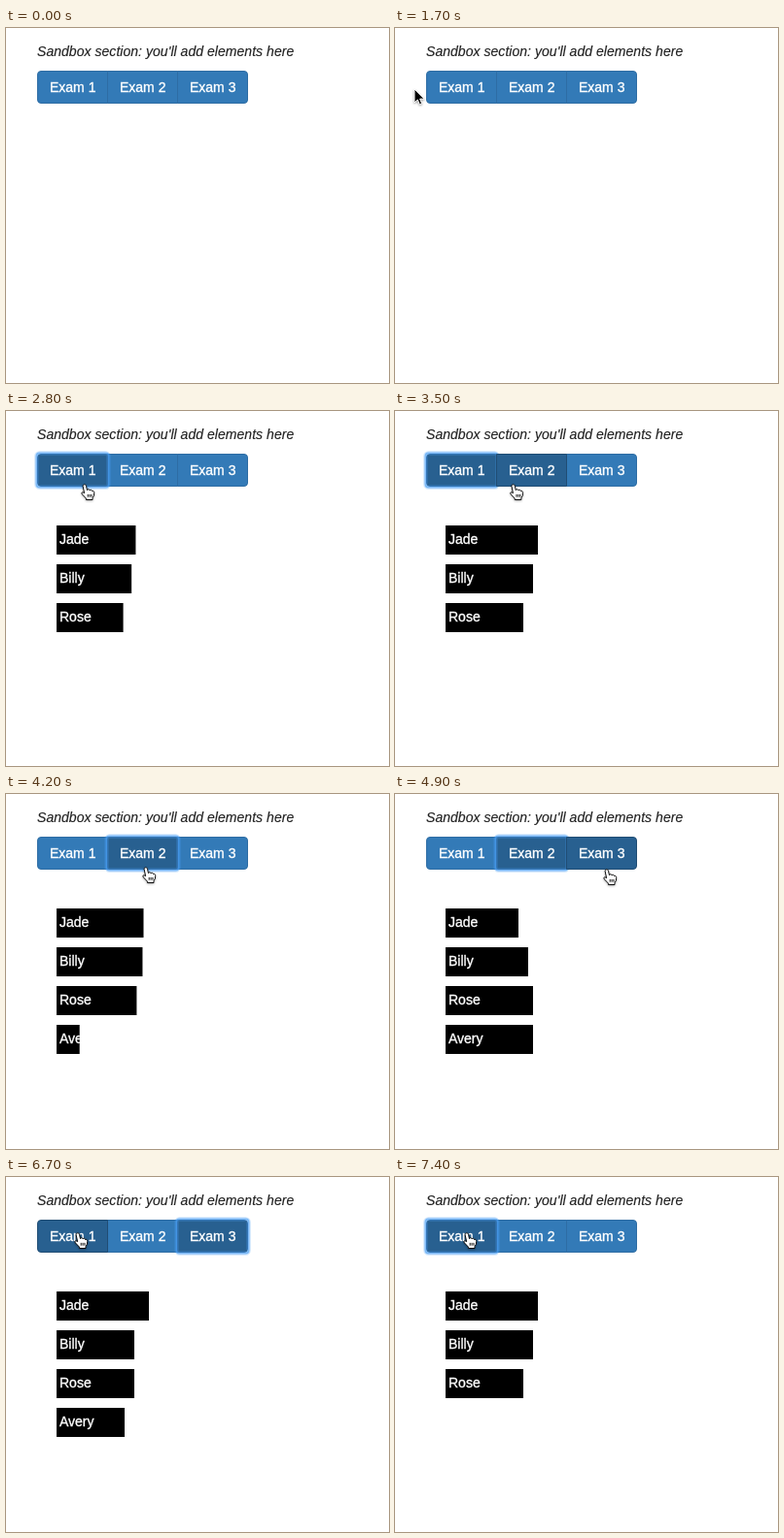
Write an HTML page that moves like this. It is 394 px wide and 366 px high and loops after 7600 ms.

```html
<!DOCTYPE html>
<html>
<head>
<meta charset="utf-8">
<style>
html, body { margin: 0; width: 100%; height: 100%; overflow: hidden; background: #fff; }
body > svg { display: block; font: 14px "Liberation Sans", Arial, sans-serif; }
text { fill: #fff; stroke: #fff; stroke-width: .35; }
#title { fill: #222; stroke: #222; stroke-width: .15; font-style: italic; letter-spacing: .04px; }
.btn path { fill: #337ab7; stroke: #2e6da4; }
.btn.dark path { fill: #286090; stroke: #204d74; }
#ring { fill: none; stroke: #4a9ff5; }
#arrow { stroke: #fff; stroke-linejoin: round; filter: drop-shadow(0 1px 1px #0006); }
#hand { fill: #fff; stroke: #000; stroke-linejoin: round; filter: drop-shadow(0 1px 1px #0005); }
</style>
</head>
<body>
<svg id="stage" width="394" height="366">
  <text id="title" x="32" y="29">Sandbox section: you'll add elements here</text>
  <g id="buttons"></g>
  <g id="bars"></g>
  <g id="cursor">
    <path id="arrow" d="M0 0V14l3.3-3.1 2 4.9 2.3-1-2-4.7h4.6z"/>
    <path id="hand" transform="scale(.94)" d="M-2 1.5C-2-.7 1.2-.8 1.6 1.3L2.6 6C3 4.6 5.2 4.8 5.4 6.2C6.2 5.2 7.9 5.6 8.1 7C9.4 6.4 10.4 7.3 10.3 9L10 12 8.5 14.5v2h-7V15L-2.8 10.5C-4.2 8.6-2.5 7.6-1 8.8l.6.4zM3.4 10.5v3m2-3v3m2-3v3"/>
  </g>
</svg>
<script>
const LOOP = 7600, STEP = 100, GROW = 700;
const names = ['Jade', 'Billy', 'Rose', 'Avery'];
const exams = [[95, 90, 80], [75, 85, 90, 90], [95, 80, 80, 70]];
// press: button gets focus; start: bars begin to move
const clicks = [
  { press: 2500, start: 2564, exam: 0 },
  { press: 4000, start: 4069, exam: 1 },
  { press: 5300, start: 5385, exam: 2 },
  { press: 6800, start: 6890, exam: 0 }
];
// [begin, end, from, to]
const moves = [
  [1700, 1900, [20, 63], [81, 76]],
  [3200, 3700, [81, 76], [144, 76]],
  [4700, 4900, [144, 76], [218, 78]],
  [6000, 6700, [218, 78], [74, 58]]
];

const $ = id => document.getElementById(id);
const show = (el, on) => el.setAttribute('visibility', on ? 'visible' : 'hidden');

// Only the outer ends of the button group are rounded.
function buttonPath(i) {
  const l = i == 0 ? 3.5 : 0, r = i == 2 ? 3.5 : 0;
  return `M${.5 + l} .5H${72.5 - r}q${r} 0 ${r} ${r}V${33.5 - r}q0 ${r} ${-r} ${r}H${.5 + l}q${-l} 0 ${-l} ${-l}V${.5 + l}q0 ${-l} ${l} ${-l}z`;
}

const ringRect = (width, opacity) =>
  `<rect y="43.5" width="74" height="35" rx="3" stroke-width="${width}" opacity="${opacity}"/>`;

$('buttons').innerHTML = exams.map((_, i) => `<g class="btn" transform="translate(${32 + 72 * i} 44)">
  <path d="${buttonPath(i)}"/><text x="13" y="22">Exam ${i + 1}</text></g>`).join('')
  + `<g id="ring">${ringRect(4.5, .28)}${ringRect(2, .6)}</g>`;
$('bars').innerHTML = names.map((name, i) => `<svg x="52" y="${118 + 40 * i}" width="0" height="30" overflow="hidden">
  <rect width="100%" height="30"/><text x="3" y="19">${name}</text></svg>`).join('');
const buttons = [...document.querySelectorAll('.btn')], bars = [...$('bars').children];

function bounce(p) {
  const k = 7.5625;
  if (p < 4 / 11) return k * p * p;
  if (p < 8 / 11) return k * (p - 6 / 11) ** 2 + 3 / 4;
  if (p < 10 / 11) return k * (p - 9 / 11) ** 2 + 15 / 16;
  return k * (p - 21 / 22) ** 2 + 63 / 64;
}

function cursorAt(t) {
  const move = moves.filter(m => t >= m[0]).pop();
  if (!move) return null;
  const [begin, end, from, to] = move;
  const p = Math.min(1, (t - begin) / (end - begin));
  const e = p * p * (3 - 2 * p);
  return from.map((v, i) => v + (to[i] - v) * e);
}

// Dark buttons lie above the others, in order, each focus ring just above its button.
function drawButtons(hover, focus) {
  show($('ring'), focus >= 0);
  $('ring').setAttribute('transform', `translate(${31.5 + 72 * focus} 0)`);
  buttons.forEach((b, i) => {
    const dark = i == hover || i == focus;
    b.classList.toggle('dark', dark);
    if (dark) $('buttons').append(b);
    if (i == focus) $('buttons').append($('ring'));
  });
}

function drawBars(t) {
  const n = clicks.filter(c => t >= c.start).length - 1;
  const goal = n < 0 ? [] : exams[clicks[n].exam];
  const old = n < 1 ? [] : exams[clicks[n - 1].exam];
  const e = n < 0 ? 0 : bounce(Math.min(1, (t - clicks[n].start) / GROW));
  bars.forEach((bar, i) => {
    const from = old[i] || 0;
    bar.setAttribute('width', i in goal ? from + (goal[i] - from) * e : 0);
  });
}

function draw(t) {
  const pos = cursorAt(t), overButton = pos && pos[0] >= 32;
  const hover = overButton ? Math.floor((pos[0] - 32) / 72) : -1;
  const click = clicks.filter(c => t >= c.press).pop();
  drawButtons(hover, click ? click.exam : -1);
  drawBars(t);
  show($('arrow'), pos && !overButton);
  show($('hand'), overButton);
  if (pos) $('cursor').setAttribute('transform', `translate(${pos})`);
}

const origin = performance.now();
function tick() {
  const t = (performance.now() - origin) % LOOP;
  draw(Math.floor(t / STEP) * STEP);
  requestAnimationFrame(tick);
}
tick();
</script>
</body>
</html>
```
